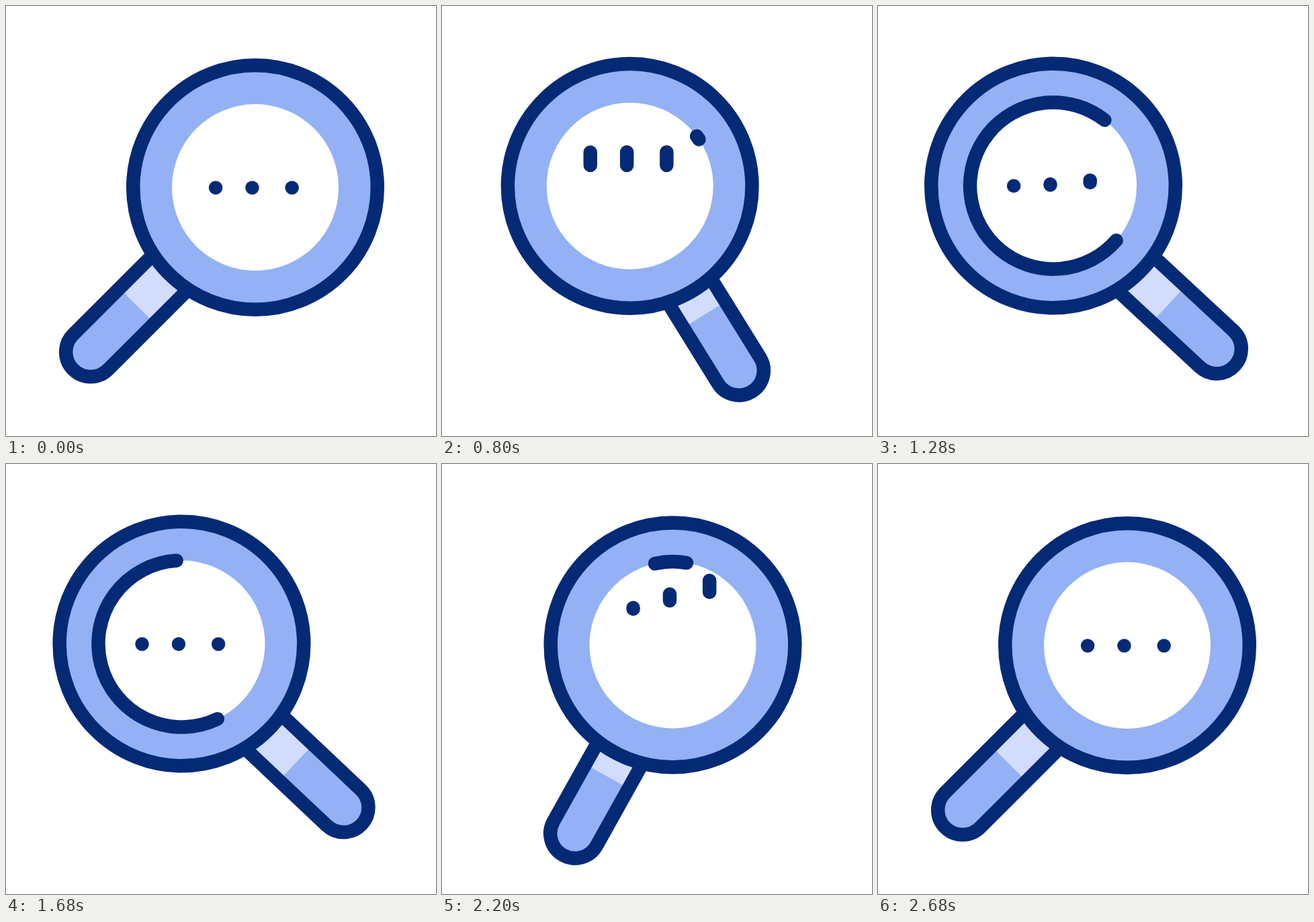
These frames come from a looping animation (640x640 px, 3000 ms). An HTML page:

```html
<!DOCTYPE html>
<html lang="en">
<head>
<meta charset="utf-8">
<title>Searching</title>
<style>
  html, body { margin: 0; width: 100%; height: 100%; overflow: hidden; background: #fff; }
  svg { display: block; width: 100%; height: 100%; }
  .ink { fill: #042a76; }
  .line { stroke: #042a76; stroke-width: 20.5; stroke-linecap: round; }
  .blue { fill: #93b1f4; }
  .pale { fill: #d2dcfd; }
</style>
</head>
<body>
<svg viewBox="0 0 640 640">
  <g id="handle">
    <rect class="pale" x="-37" y="-10" width="74" height="103"/>
    <path class="blue" d="M-37 92.5H37V190A37 37 0 0 1 -37 190Z"/>
    <path class="line" fill="none" d="M-36.8 0V190A36.8 36.8 0 0 0 36.8 190V0"/>
  </g>
  <g id="lens">
    <circle class="blue line" r="181.8"/>
    <circle r="124" fill="#fff"/>
    <path id="arc" class="line" fill="none"/>
    <rect class="ink dot" x="-69.2" width="20.5" rx="10.25"/>
    <rect class="ink dot" x="-14.8" width="20.5" rx="10.25"/>
    <rect class="ink dot" x="44.4" width="20.5" rx="10.25"/>
  </g>
</svg>
<script>
  const LOOP = 3000, STEP = 40, DOT_DELAY = 60, ARC_R = 124;

  // Smooth monotone curve through [time, value] keys, flat at both ends.
  function track(...keys) {
    const slope = i => (keys[i + 1][1] - keys[i][1]) / (keys[i + 1][0] - keys[i][0]);
    const tangents = keys.map((_, i) => {
      if (i === 0 || i === keys.length - 1) return 0;
      const a = slope(i - 1), b = slope(i);
      return a * b > 0 ? 2 * a * b / (a + b) : 0;
    });
    return t => {
      if (t <= keys[0][0]) return keys[0][1];
      const i = keys.findIndex(k => k[0] > t) - 1;
      if (i < 0) return keys[keys.length - 1][1];
      const [t0, v0] = keys[i], [t1, v1] = keys[i + 1];
      const d = t1 - t0, s = (t - t0) / d, r = 1 - s;
      return v0 * (1 + 2 * s) * r * r + v1 * s * s * (3 - 2 * s)
        + d * s * r * (tangents[i] * r - tangents[i + 1] * s);
    };
  }

  const slide = track([250, 0], [520, .145], [800, .83], [1080, 1], [1640, 1], [1920, .85], [2200, .25], [2560, 0]);
  const angle = track([250, 45], [520, 31.7], [800, -31.8], [1080, -47.1], [1640, -47.1], [1920, -31.1], [2200, 29.2], [2560, 45]);
  const pivotX = track([250, 260.3], [520, 274.8], [800, 341.9], [1080, 364.8], [1640, 364.8], [1920, 351], [2200, 290.7], [2560, 260.3]);
  const pivotY = track([250, 380.7], [520, 380.3], [660, 384], [800, 381], [1640, 381], [1920, 379.2], [2200, 384.1], [2560, 380.7]);
  const stretch = track([395, 0], [630, -1], [790, -1], [1290, 0], [1683, 0], [1955, 1], [2040, -1], [2238, 0]);
  const lift = track([1780, 0], [1940, 8], [2200, -51], [2520, 0]);
  const head = track([770, 34], [1280, 319], [1400, 322], [1920, 246], [2200, 102.4], [2320, 60]);
  const tail = track([800, 34], [1280, 52], [1920, 108.5], [2200, 80.5], [2320, 60]);

  const handle = document.getElementById('handle');
  const lens = document.getElementById('lens');
  const arc = document.getElementById('arc');
  const dots = document.querySelectorAll('.dot');

  function onArc(deg) {
    const a = deg * Math.PI / 180;
    return `${ARC_R * Math.cos(a)} ${-ARC_R * Math.sin(a)}`;
  }

  function draw(t) {
    const u = slide(t);
    lens.setAttribute('transform', `translate(${371 - 110 * u} ${270 - 2.5 * u})`);
    handle.setAttribute('transform', `translate(${pivotX(t)} ${pivotY(t)}) rotate(${angle(t)})`);

    const from = tail(t), to = head(t);
    arc.setAttribute('d', to - from > .2
      ? `M${onArc(from)}A${ARC_R} ${ARC_R} 0 ${to - from > 180 ? 1 : 0} 0 ${onArc(to)}` : '');

    dots.forEach((dot, i) => {
      const w = stretch(t - i * DOT_DELAY);
      const h = 20.5 + 19.5 * Math.abs(w);
      dot.setAttribute('height', h);
      dot.setAttribute('y', .4 + lift(t) + 41 * w - h / 2);
    });
  }

  const start = performance.now();
  function tick() {
    const t = (performance.now() - start) % LOOP;
    draw(Math.floor(t / STEP) * STEP);
    requestAnimationFrame(tick);
  }
  tick();
</script>
</body>
</html>
```
